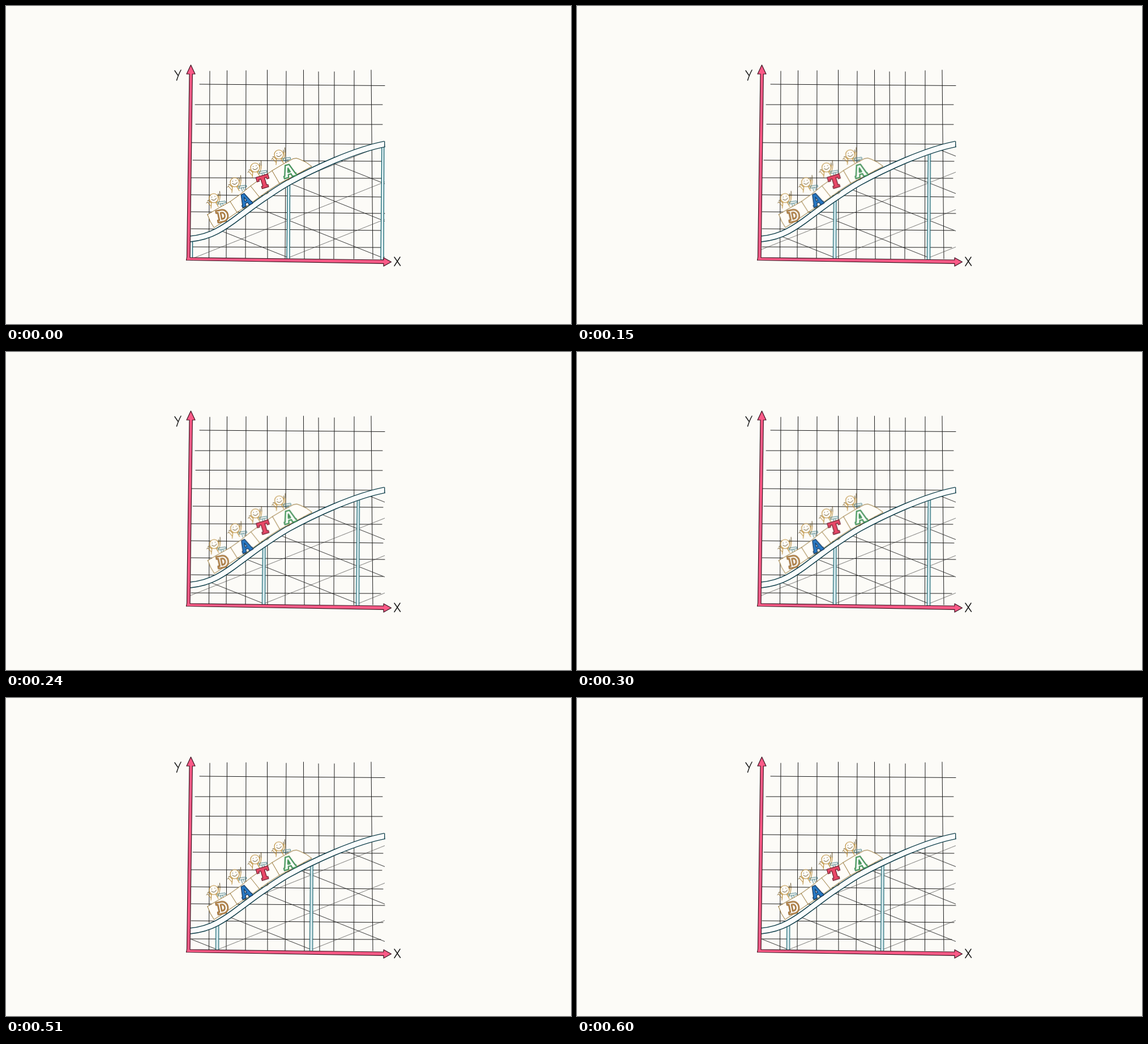
Animation, 998 px wide and 561 px high, one loop 630 ms. Source, as an HTML page:

```html
<!DOCTYPE html>
<html lang="en">
<head>
<meta charset="utf-8">
<title>Data roller coaster</title>
<style>
  html, body { margin: 0; width: 100%; height: 100%; overflow: hidden; background: #fcfbf7; }
  svg { display: block; width: 100%; height: 100%; fill: none; stroke-linecap: round; stroke-linejoin: round; }
  .grid { stroke: #1c1c1c; stroke-width: 1; }
  .brace { stroke: #222; stroke-width: .9; }
  .thin { stroke: #444; stroke-width: .7; stroke-dasharray: 9 .8 5 .5; }
  .post { fill: #e6f5f8; stroke: #12616e; stroke-width: 1.3; }
  .axis { fill: #fb5a87; stroke: #3a1420; stroke-width: 1.2; }
  .label { stroke: #181818; stroke-width: 1.5; }
  .car { fill: #fffdf8; stroke: #8d6a26; stroke-width: 1; }
  .skin { stroke: #b98a35; stroke-width: 1.1; }
  .ink { stroke: #5d4a22; stroke-width: 1; }
  .bar { stroke: #457f88; stroke-width: 1; }
  .scaffold { animation: ride 630ms step-end infinite; }
  .train { animation: shake 630ms step-end infinite; }
  @keyframes ride {
    0% { transform: translateX(0); }
    23.8% { transform: translateX(-43.5px); }
    57.13% { transform: translateX(-86px); }
    80.94% { transform: translateX(-125.5px); }
  }
  @keyframes shake {
    0% { transform: translate(0, 0); }
    23.8% { transform: translate(.6px, -.3px); }
    57.13% { transform: translate(-1px, 0); }
    80.94% { transform: translate(0, -.3px); }
  }
</style>
</head>
<body>
<svg viewBox="0 0 998 561" role="img" aria-label="DATA roller coaster climbing a chart with axes X and Y">
  <defs>
    <path id="rail" d="M325 411C347 409 360 404 373 397C387 389.5 399 381 412 371C427 360 441 349 456 339C470 329.5 484 320 499 311.5C526 297 553 284 580 272.5C610 260 640 249 669 243.5"/>
    <clipPath id="below">
      <path d="M325 411C347 409 360 404 373 397C387 389.5 399 381 412 371C427 360 441 349 456 339C470 329.5 484 320 499 311.5C526 297 553 284 580 272.5C610 260 640 249 669 243.5V456H325Z"/>
    </clipPath>
    <g id="rider">
      <path class="skin" d="M-4 8L-5 18M4 8L8 15M4 9Q8 4 8.5-4M7 11Q11 4 11-4M-4 9L-9 4M-5 14L-11 7"/>
      <circle class="skin" r="8" fill="#fffdf8"/>
      <path class="ink" d="M8.5-4L8-8M11-4L10.500-12M-9 4L-11 4.500M-11 7L-13 8.500"/>
      <path class="ink" d="M-3.500-2V-1.500M2-3.500V-3M-4 2Q1 6.500 4.500 0"/>
      <path class="bar" d="M7 7L20 5L21 8L8 10.500ZM12 10L13.500 16M15.500 9.500L17 14"/>
    </g>
    <path id="A" d="M-3.500-11H3.500L10 7H11V11H3.500L2.500 6H-2.500L-3.500 11H-11V7H-9.500ZM0-5L-2 2H2Z"/>
    <path id="T" d="M-11-11H11V-3H7V-6H3.500V7H6V11H-6V7H-3.500V-6H-7V-3H-11Z"/>
    <path id="D" d="M-10-11H0C14-11 14 11 0 11H-10V7H-7V-7H-10ZM-2-6V6C7 7 7-7-2-6Z"/>
  </defs>

  <g id="grid" class="grid"></g>
  <g clip-path="url(#below)"><g id="scaffold" class="scaffold"></g></g>

  <g stroke-linecap="butt">
    <use href="#rail" stroke="#12404c" stroke-width="11.400"/>
    <use href="#rail" stroke="#fafdfd" stroke-width="8.400"/>
    <path d="M325 405.500V416.500M668.700 238.500V248.500" stroke="#12404c" stroke-width="1.300"/>
  </g>

  <g class="train">
    <use href="#rider" x="367" y="339"/>
    <use href="#rider" x="404" y="311"/>
    <use href="#rider" x="440" y="285"/>
    <use href="#rider" x="482" y="262"/>
    <path class="car" d="M356 368Q374 357 396 345Q414 333 432 317.500Q452 303 470 290.500Q490 278 507 269.500Q513 267 519 270.500Q531 275 540 283Q514 297 483 313Q465 324 447.500 337Q428 352 408 364Q388 378 367.500 391Q360 381 356 368Z"/>
    <path class="car" d="M396 345L408 364M432 317.500L447.500 337M470 290.500L483 313"/>
    <path class="ink" d="M385 380q3 2 5-3M420 356q3 2 5-3M459 331q3 2 5-3M497 307q3 1 5-3"/>
    <g transform="translate(382 370) rotate(-12) scale(.95)">
      <use href="#D" fill="#fffaf0" stroke="#70491b" stroke-width="2.600"/>
      <use href="#D" stroke="#e2a55a" stroke-width="1"/>
    </g>
    <g transform="translate(422.500 342) rotate(-24) scale(.88 1)">
      <use href="#A" fill="#2879c4" stroke="#17395f" stroke-width="1.400"/>
    </g>
    <g transform="translate(455 310) rotate(-17)">
      <use href="#T" fill="#ea4868" stroke="#7a2636" stroke-width="1.400"/>
    </g>
    <g transform="translate(499.500 291) rotate(-16)">
      <use href="#A" fill="#fbfff9" stroke="#256c3b" stroke-width="2.200"/>
      <use href="#A" stroke="#6fca83" stroke-width=".8"/>
    </g>
  </g>

  <path class="axis" d="M318.500 448.500L319.500 443L324 120H319L326.500 104L334 120H329.300L325 443.800L667 448V444L680.500 451.500L667 459V454.300Z"/>
  <path class="label" d="M298 114L303.500 122M309 113Q305 120 301.500 131M686 443L696.500 458M696 443L686 458.500"/>
</svg>
<script>
  const NS = 'http://www.w3.org/2000/svg';
  const path = (parent, d, cls = '') => {
    const p = document.createElementNS(NS, 'path');
    p.setAttribute('d', d);
    if (cls) p.setAttribute('class', cls);
    parent.append(p);
  };

  // Columns: top x, bottom x, top y
  const grid = document.getElementById('grid');
  [[360, 358.5, 115], [390.5, 389, 114], [424, 423, 114], [461.5, 462, 113], [495, 493, 115],
   [525.5, 527, 113], [552, 554, 116], [580, 579, 116], [615, 614.5, 114], [645, 648, 113]]
    .forEach(([a, b, y]) => path(grid, `M${a} ${y}L${b} 446`));

  // Rows: left y, right y, left x, right x
  [[138, 140.5, 342, 669], [174, 174, 334, 665], [208.5, 209, 335, 665], [241, 244, 327, 666],
   [272, 274, 330, 666], [303, 304, 327, 664], [333, 337, 327, 666], [363, 366, 327, 669],
   [393, 396, 327, 666], [425, 426, 327, 662]]
    .forEach(([a, b, l, r]) => path(grid, `M${l} ${a}L${r} ${b}`));

  // Braced bays between the posts
  const scaffold = document.getElementById('scaffold');
  const BAY = 166, RISE = 66;
  for (let x = 333; x < 800; x += BAY) {
    for (let y = 444; y > 240; y -= RISE) {
      path(scaffold, `M${x} ${y}L${x + BAY} ${y - RISE}`, 'thin');
      path(scaffold, `M${x} ${y - RISE}L${x + BAY} ${y}`, 'brace');
    }
  }
  for (const x of [327.5, 499, 665]) {
    path(scaffold, `M${x - 1} 230L${x - 3} 448H${x + 2}L${x + 2.8} 230Z`, 'post');
  }
</script>
</body>
</html>
```
